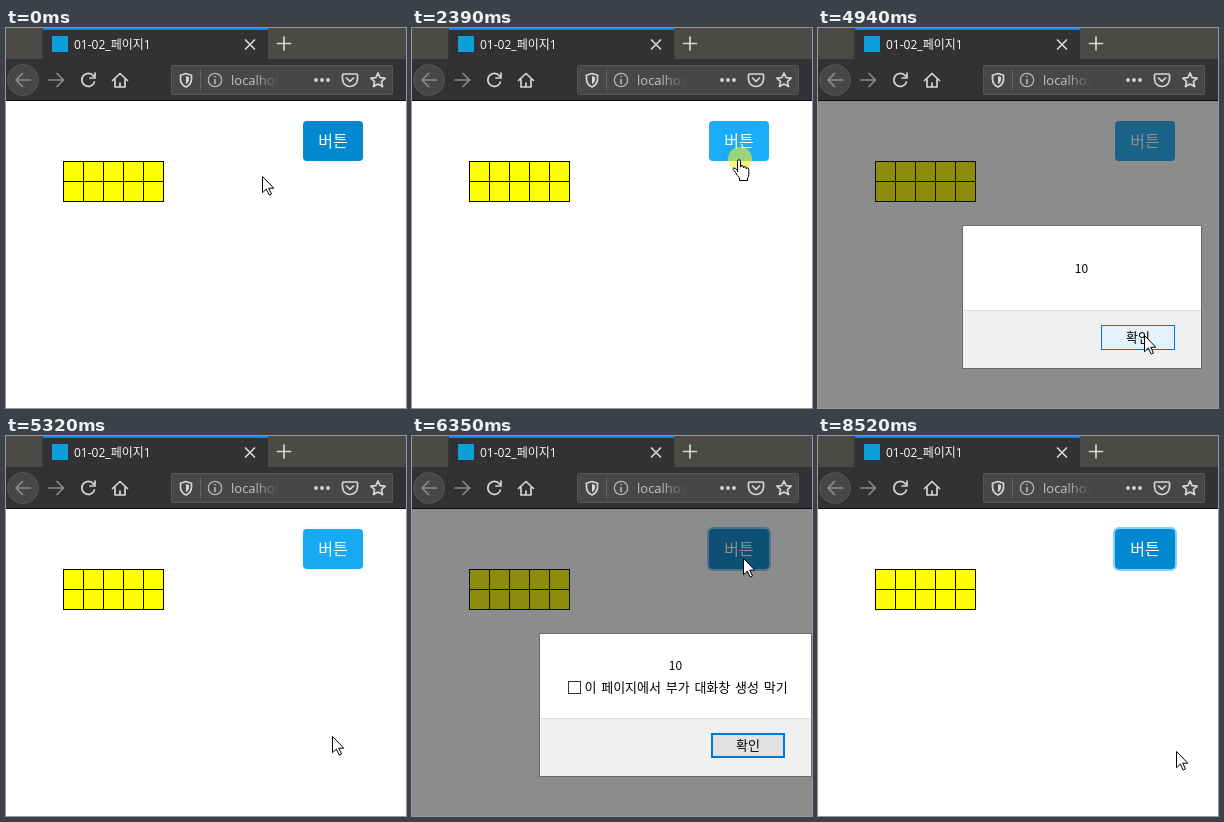
Recreate the animation shown at these times as an HTML page. Size 400 px wide and 380 px high, loop 8.68 s.

```html
<!DOCTYPE html>
<html lang="ko">
<head>
<meta charset="utf-8">
<title>버튼</title>
<style>
  html, body { margin: 0; width: 100%; height: 100%; overflow: hidden; background: #fff; }
  svg { display: block; width: 400px; height: 380px; }
  text { font-family: "Open Sans", "Noto Sans CJK KR", "Noto Sans CJK", sans-serif; font-size: 12px; }
  .kr { font-family: "Noto Sans CJK KR", "Noto Sans CJK", sans-serif; }
  .mid { text-anchor: middle; }
  .icon { fill: none; stroke: #d6d6d7; stroke-width: 1.7; stroke-linecap: round; stroke-linejoin: round; }
  .off { stroke: #8b8b8d; }
  .crisp { shape-rendering: crispEdges; }
</style>
</head>
<body>
<svg viewBox="0 0 400 380">
  <defs>
    <linearGradient id="fade" gradientUnits="userSpaceOnUse" x1="248" x2="274" y1="0" y2="0">
      <stop stop-color="#c4c4c5"/><stop offset="1" stop-color="#474749"/>
    </linearGradient>
  </defs>

  <rect width="400" height="380" fill="#fff"/>

  <!-- browser chrome -->
  <rect width="400" height="32" fill="#4b4a47"/>
  <rect y="31" width="400" height="42" fill="#323234"/>
  <rect x="37" width="225" height="32" fill="#323234"/>
  <rect x="36" width="1" height="31" fill="#3a3937"/>
  <rect x="37" width="225" height="2" fill="#0a84ff"/>
  <rect y="72" width="400" height="1" fill="#0c0c0d"/>
  <rect x="46" y="8" width="16" height="16" fill="#0c9ddb"/>
  <text x="68" y="21" fill="#f9f9fa">01-02_페이지1</text>
  <path class="icon" d="M239.500 12l9 9m0-9l-9 9"/>
  <path class="icon" d="M271.500 15.500h13m-6.500-6.500v13"/>
  <circle cx="17" cy="52" r="15.500" fill="#474749" stroke="#57575a"/>
  <path class="icon off" stroke-width="2" d="M24.500 52h-14m6-6.500l-6.500 6.500 6.500 6.500"/>
  <path class="icon off" stroke-width="2" d="M43 52h14m-6-6.500l6.500 6.500-6.500 6.500"/>
  <path class="icon" stroke-width="2" d="M87.500 48a6.500 6.500 0 1 0 1 6M89 45v5h-5"/>
  <path class="icon" stroke-width="2" d="M106.500 52.500l7.500-7 7.500 7M109 51.500v7.500h10v-7.500M114 59v-4"/>
  <rect x="165.500" y="37.500" width="221" height="29" rx="2" fill="#474749" stroke="#58585a"/>
  <path class="icon" stroke-width="1.500" d="M180 45.500l5.500 1.700v4c0 4-2.500 6.300-5.500 7.800-3-1.500-5.500-3.800-5.500-7.800v-4z"/>
  <path d="M180 48l3 1v2.500c0 2.300-1.300 3.700-3 4.700z" fill="#d6d6d7"/>
  <path class="crisp" d="M194.500 41v22" stroke="#656567"/>
  <circle class="icon" style="stroke:#b5b5b6;stroke-width:1.300" cx="209" cy="52" r="6.700"/>
  <path class="icon" style="stroke:#b5b5b6" d="M209 51.500v4m0-7v.1"/>
  <text x="225" y="57" style="font-size:13px" fill="url(#fade)">localhos</text>
  <g fill="#d6d6d7"><circle cx="310" cy="52" r="1.900"/><circle cx="316" cy="52" r="1.900"/><circle cx="322" cy="52" r="1.900"/></g>
  <path class="icon" d="M337.500 46h13q1 0 1 1v4a7.500 7.500 0 0 1-15 0v-4q0-1 1-1zm3 4l3.500 3.300 3.500-3.300"/>
  <path class="icon" d="M372 45l2.100 4.700 5.100.5-3.800 3.400 1.100 5-4.500-2.600-4.500 2.600 1.100-5-3.800-3.400 5.100-.5z"/>

  <!-- page -->
  <path class="crisp" d="M57.500 133.500h100v40h-100zM57.500 153.500h100M77.500 133.500v40M97.500 133.500v40M117.500 133.500v40M137.500 133.500v40" fill="#ff0" stroke="#000"/>
  <rect id="ring" x="296" y="92" width="62" height="42" rx="5" fill="none" stroke="#81d1fa" stroke-width="2"/>
  <rect id="button" x="297" y="93" width="60" height="40" rx="4"/>
  <text class="kr mid" x="327" y="118.500" style="font-size:16px" fill="#fff">버튼</text>

  <!-- alert -->
  <g id="alert">
    <rect y="73" width="400" height="307" fill="#1a1a1a" fill-opacity=".5"/>
    <g class="crisp">
      <rect id="frame" y="197.500" height="143" fill="#fff" stroke="#6b6b6b"/>
      <rect id="footer" y="282" height="58" fill="#f0f0f0"/>
      <rect id="rule" y="282" height="1" fill="#dfdfdf"/>
    </g>
    <text id="message" class="kr mid" x="263.500">10</text>
    <g id="option">
      <rect id="check" class="crisp" x="156.500" y="245.500" width="12" height="12" fill="#fff"/>
      <text class="kr" x="172.500" y="256" style="font-size:13px;word-spacing:1.100px">이 페이지에서 부가 대화창 생성 막기</text>
    </g>
    <g id="ok">
      <rect class="crisp" id="okEdge" width="74" height="25"/>
      <rect class="crisp" id="okFace"/>
      <text class="kr mid" x="37" y="17" style="font-size:13px">확인</text>
    </g>
  </g>

  <!-- pointer -->
  <g id="pointer">
    <circle id="press" r="12" fill="#f0f028" fill-opacity=".6"/>
    <path id="arrow" d="M.5.500v16.200l3.800-3.600 2.900 6 2.300-1.100-2.800-5.800h5.100z" fill="#fff" stroke="#000"/>
    <path id="hand" d="M-2.500 13V2.300q0-1.600 1.500-1.600t1.500 1.600V8q.2-1.500 1.500-1.500T3.500 8v1q.2-1.400 1.400-1.400T6.300 9v1q.3-1.200 1.300-1.200T8.800 10.500v5q0 2-1.300 3.500v2.500h-8V19q-2.500-2.500-3.500-5-1-1.800-2.800-3.200-.8-1.300.5-1.800 1.500-.3 3.800 2.500z" fill="#fff" stroke="#000" stroke-linejoin="round"/>
  </g>
</svg>
<script>
const LOOP = 8680;
const $ = id => document.getElementById(id);
const set = (id, attrs) => { for (const k in attrs) $(id).setAttribute(k, attrs[k]); };
const show = (id, on) => set(id, { visibility: on ? 'inherit' : 'hidden' });
const within = (t, a, b) => t >= a && t < b;
const ease = p => p * p * (3 - 2 * p);
const mix = (a, b, p) => `rgb(${a.map((v, i) => Math.round(v + (b[i] - v) * p))})`;

const BASE = [2, 136, 209], HOVER = [27, 173, 248];

// start, end, steps, x, y
const moves = [
  [220, 690, 7, 328, 131],
  [4550, 4940, 6, 326, 307],
  [5320, 5320, 1, 326, 300],
  [5410, 5800, 6, 331, 122],
  [6810, 7130, 5, 358, 314.5],
];

// time, hover tint, focus ring
const buttonStates = [
  [0, 0, 0], [610, .5, 0], [690, 1, 0], [2470, 0, 1], [2550, 1, 0],
  [5320, .88, .12], [5410, 0, 1], [6430, .5, .5], [6510, 1, 0],
  [8370, 1, 0], [8450, .5, .5], [8520, 0, 1],
];

const presses = [[2390, 2470], [5170, 5250], [6200, 6350], [8220, 8370]];

function pointerAt(t) {
  let x = 256, y = 148;
  for (const [start, end, steps, tx, ty] of moves) {
    if (t < start) break;
    const gap = (end - start) / (steps - 1) || 1;
    const step = Math.min(steps, Math.floor((t - start) / gap + 1e-6) + 1);
    const p = ease(step / steps);
    x += (tx - x) * p;
    y += (ty - y) * p;
  }
  return [x, y];
}

function drawAlert(kind, x, y, pressed) {
  show('alert', kind);
  if (!kind) return;
  const second = kind === 2;
  const left = second ? 128 : 145, width = second ? 271 : 238;
  const okX = second ? 299 : 283;
  set('frame', { x: left - .5, width: width + 1 });
  for (const id of ['footer', 'rule']) set(id, { x: left, width });
  set('message', { y: second ? 234 : 245 });
  show('option', second);
  const overLabel = x < 373 && within(y, 238, 264);
  set('check', { stroke: overLabel ? '#0078d7' : '#333' });

  const over = within(x, okX, okX + 74) && within(y, 297, 322);
  const edge = over ? 1 : 2;
  set('ok', { transform: `translate(${okX} 297)` });
  set('okEdge', { fill: pressed ? '#005499' : '#0078d7' });
  set('okFace', {
    x: edge, y: edge, width: 74 - 2 * edge, height: 25 - 2 * edge,
    fill: pressed ? '#cce4f7' : over ? '#e5f1fb' : '#e1e1e1',
  });
}

function draw(t) {
  const [x, y] = pointerAt(t);
  const kind = within(t, 2470, 5320) ? 1 : within(t, 6350, 8370) ? 2 : 0;
  const pressed = presses.some(([a, b]) => within(t, a, b));
  const [, tint, ring] = buttonStates.filter(s => s[0] <= t).pop();
  const hand = !kind && x >= 297 && y < 133;

  set('button', { fill: mix(BASE, HOVER, tint) });
  set('ring', { 'stroke-opacity': ring });
  drawAlert(kind, x, y, pressed);

  set('pointer', { transform: `translate(${Math.round(x)} ${Math.round(y)})` });
  show('pointer', !within(t, 2470, 3770));
  show('press', pressed);
  show('hand', hand);
  show('arrow', !hand);
}

function tick() {
  draw(performance.now() % LOOP);
  requestAnimationFrame(tick);
}
tick();
</script>
</body>
</html>
```
